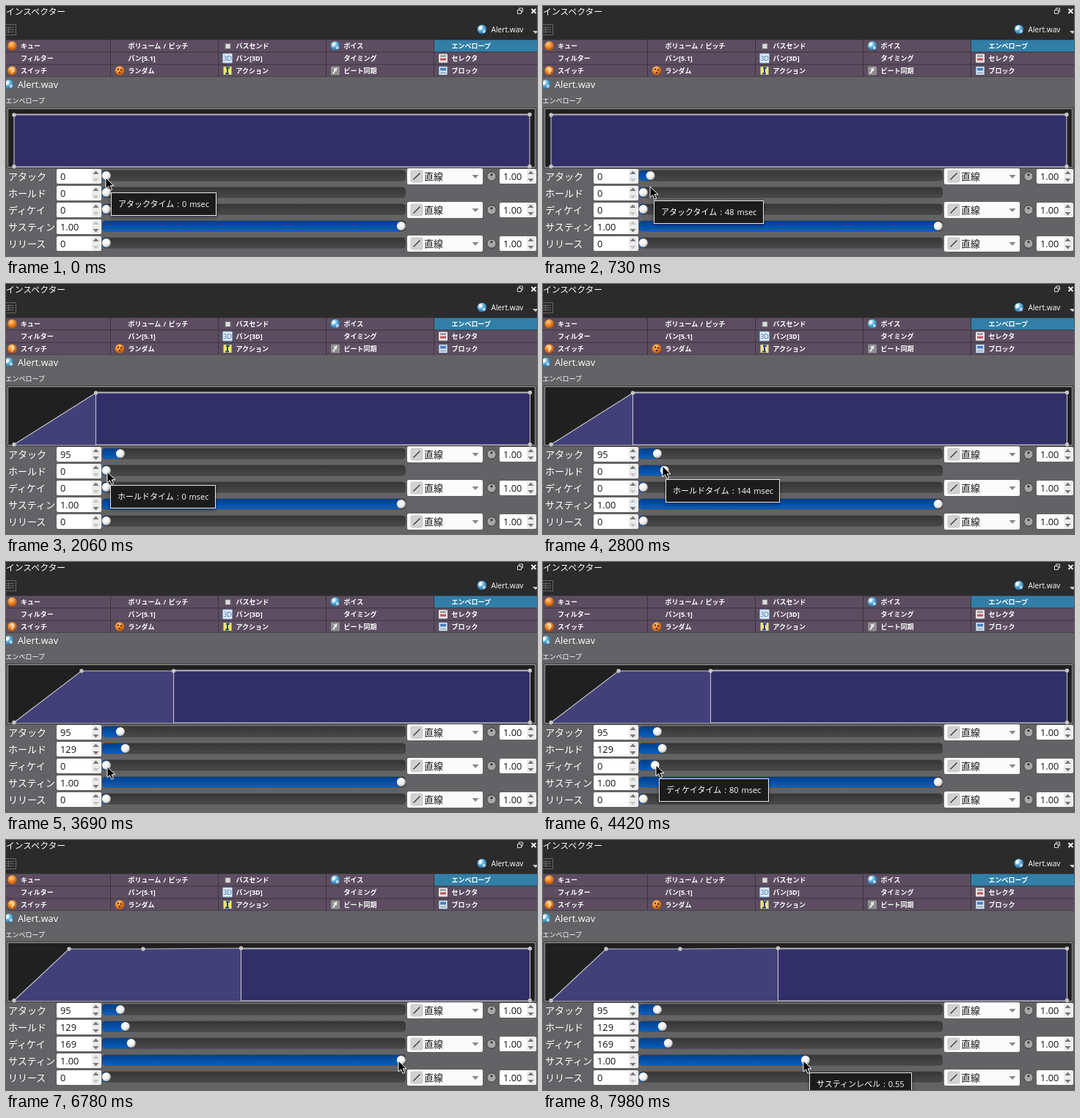
These frames come from a looping animation (724x342 px, 8 s). An HTML page:

```html
<!DOCTYPE html>
<html lang="ja">
<head>
<meta charset="utf-8">
<title>Envelope inspector</title>
<style>
html, body { margin: 0; width: 100%; height: 100%; overflow: hidden; background: #636366; }
svg { display: block; width: 724px; height: 342px; }
text { font-family: "Open Sans", "Noto Sans CJK JP", "Noto Sans CJK", sans-serif; font-weight: 500; fill: #fff; word-spacing: 1px; }
.num, .combo { font-size: 12.8px; fill: #111; }
.label { font-size: 13px; }
.tab { font-size: 9px; font-weight: 700; }
</style>
</head>
<body>
<svg id="stage" viewBox="0 0 724 342">
  <defs>
    <linearGradient id="track" x2="0" y2="1"><stop stop-color="#363636"/><stop offset="1" stop-color="#494949"/></linearGradient>
    <linearGradient id="blue" x2="0" y2="1"><stop stop-color="#003f8c"/><stop offset="1" stop-color="#0a5fbe"/></linearGradient>
    <radialGradient id="ball" cx=".4" cy=".35" r=".7"><stop stop-color="#fff"/><stop offset=".6" stop-color="#eee"/><stop offset="1" stop-color="#aaa"/></radialGradient>
    <radialGradient id="orange" cx=".4" cy=".3" r=".75"><stop stop-color="#ffd08a"/><stop offset=".5" stop-color="#ee8420"/><stop offset="1" stop-color="#a84c08"/></radialGradient>
    <radialGradient id="globe" cx=".35" cy=".3" r=".8"><stop stop-color="#e8f8ff"/><stop offset=".45" stop-color="#5ab0dc"/><stop offset="1" stop-color="#16508c"/></radialGradient>
    <filter id="shadow" x="-10%" y="-30%" width="120%" height="170%"><feDropShadow dx="0" dy="2" stdDeviation="2.5" flood-opacity=".45"/></filter>
  </defs>
  <g id="chrome"></g>
  <g id="envelope"></g>
  <g id="rows"></g>
  <g id="tip">
    <rect id="tipBox" x=".5" y=".5" height="31" fill="#1f1f1f" stroke="#e8e8e8" filter="url(#shadow)"/>
    <text id="tipText" x="10" y="20" font-size="11"></text>
  </g>
  <path id="cursor" d="M0 0V15L3.5 11.7L6 17.3L8.6 16.2L6.2 10.8H11Z" fill="#000" stroke="#fff" stroke-width="1"/>
</svg>
<script>
const $ = id => document.getElementById(id);
const rect = (x, y, w, h, fill, more = '') =>
  `<rect x="${x}" y="${y}" width="${w}" height="${h}" fill="${fill}" ${more}/>`;
const disc = (x, y, r, fill, more = '') => `<circle cx="${x}" cy="${y}" r="${r}" fill="${fill}" ${more}/>`;
const path = (d, fill, more = '') => `<path d="${d}" fill="${fill}" ${more}/>`;
const text = (x, y, s, more = '') => `<text x="${x}" y="${y}" ${more}>${s}</text>`;

// ---- header and tabs
const icons = {
  orange: (x, y) => disc(x, y, 6.3, 'url(#orange)'),
  turn: (x, y) => icons.orange(x, y) +
    path(`M${x - 2} ${y - 3}h3q3 3 -1 4v3`, 'none', 'stroke="#fff0d8" stroke-width="1.4"'),
  dice: (x, y) => icons.orange(x, y) +
    [[-2, -2], [2, -1], [0, 2.5]].map(([a, b]) => disc(x + a, y + b, 1.2, '#5a2600')).join(''),
  globe: (x, y) => disc(x, y, 6.3, 'url(#globe)') +
    path(`M${x - 4} ${y - 4}q5 -1 4 2t-4 3z`, '#fff', 'opacity=".8"') +
    path(`M${x + 1} ${y + 1}q3 -2 4 1t-4 3z`, '#e4f4fc', 'opacity=".7"'),
  send: (x, y) => rect(x - 3, y - 3, 7, 7, '#ddd', 'stroke="#777"'),
  pan: (x, y) => rect(x - 6.5, y - 6.5, 13, 13, '#e4eefa', 'rx="1" stroke="#7f9cc0"') +
    text(x, y + 3.5, '3D', 'font-size="9" font-weight="700" text-anchor="middle" style="fill:#2a62a8"'),
  action: (x, y) => rect(x - 6, y - 6, 12, 12, '#f2e66a', 'stroke="#557"') +
    path(`M${x - 2} ${y - 4}h5M${x} ${y - 4}v8M${x - 3} ${y + 4}h5`, 'none', 'stroke="#1d3f8c" stroke-width="2"'),
  beat: (x, y) => rect(x - 6, y - 6, 12, 12, '#8e8e8e', 'rx="1"') +
    path(`M${x - 3} ${y + 4}l5 -8M${x - 2} ${y - 3}l4 3`, 'none', 'stroke="#eee" stroke-width="2"'),
  select: (x, y) => rect(x - 6, y - 6, 12, 12, '#e6e6e6', 'rx="1"') +
    rect(x - 4, y - 4, 8, 2, '#888') + rect(x - 4, y, 8, 3, '#c8505a'),
  block: (x, y) => rect(x - 6, y - 6, 12, 12, '#dfe9f6', 'rx="1" stroke="#567"') +
    rect(x - 4, y - 4, 8, 4, '#4a7fc0') + rect(x - 4, y + 2, 8, 2, '#9ab')
};
const tabs = [
  ['キュー', 'orange'], ['ボリューム / ピッチ'], ['バスセンド', 'send'], ['ボイス', 'globe'], ['エンベロープ'],
  ['フィルター'], ['パン[5.1]'], ['パン[3D]', 'pan'], ['タイミング'], ['セレクタ', 'select'],
  ['スイッチ', 'turn'], ['ランダム', 'dice'], ['アクション', 'action'], ['ビート同期', 'beat'], ['ブロック', 'block']
];
const colX = [0, 143, 290, 437, 584, 725];
let out = rect(0, 0, 724, 46, '#2b2b2c') + rect(0, 46, 724, 51, '#3c333f') +
  text(0, 11.5, 'インスペクター', 'font-size="11.8"') +
  path('M697.5 5.5h5v5h-5zM699.5 5v-2h5v5h-2', 'none', 'stroke="#ddd"') +
  path('M716.5 4l6 6m0 -6l-6 6', 'none', 'stroke="#eee" stroke-width="2"') +
  path('M-1 25.5H13.5V39.5H-1M0 29.5h11M0 32.5h11M0 35.5h11M3.5 28v9', 'none', 'stroke="#666"') +
  icons.globe(649, 32) + text(661.5, 36, 'Alert.wav', 'font-size="10.2"') +
  path('M718 34h8l-4 4z', '#ccc');
tabs.forEach(([name, icon], i) => {
  const c = i % 5, y = 46 + 17 * Math.floor(i / 5), x = colX[c];
  out += rect(x, y + .5, colX[c + 1] - x - 1, 16, i === 4 ? '#317fa7' : '#5c4e60');
  if (icon) out += icons[icon](x + (c ? 12 : 8.5), y + 8.5);
  out += text(x + (c ? 23.5 : 20), y + 12, name, 'class="tab"');
});
out += icons.globe(4, 107) + text(16, 112, 'Alert.wav', 'font-size="12.8"') +
  text(-.5, 132.5, 'エンベロープ', 'font-size="9"') +
  rect(1.5, 139.5, 721, 82, '#202020', 'stroke="#3c3c3e"') +
  rect(2.5, 140.5, 719, 80, 'none', 'stroke="#a2a2a5"');
$('chrome').innerHTML = out;

// ---- parameter rows
const rows = [
  { name: 'アタック', tip: 'アタックタイム', max: 2000, curve: true },
  { name: 'ホールド', tip: 'ホールドタイム', max: 2000 },
  { name: 'ディケイ', tip: 'ディケイタイム', max: 2000, curve: true },
  { name: 'サスティン', tip: 'サスティンレベル', max: 1 },
  { name: 'リリース', tip: 'リリースタイム', max: 2000, curve: true }
];
const show = (i, v) => i === 3 ? v.toFixed(2) : String(Math.round(v));
const spin = (x, y, w, id, s) =>
  rect(x, y - 10, w, 20, '#fff', 'rx="2"') + rect(x + w - 13, y - 9.5, 12.5, 19, '#ececec', 'rx="2"') +
  path(`M${x + w - 11.5} ${y - 3}h8l-4 -4.5z`, '#777', `id="${id}Up"`) +
  path(`M${x + w - 11.5} ${y + 3}h8l-4 4.5z`, '#777', `id="${id}Dn"`) +
  text(x + 5, y + 4.7, s, `class="num" id="${id}"`);

$('rows').innerHTML = rows.map((r, i) => {
  const y = 233 + 23 * i;
  let s = text(3, y + 5, r.name, 'class="label"') + spin(69, y, 61, 'v' + i, '') +
    rect(131.5, y - 8, 413, 14, 'url(#track)', 'rx="4" stroke="#3a3a3a" stroke-width=".8"') +
    rect(131.5, y - 8, 6, 14, 'url(#blue)', `rx="4" id="fill${i}"`) +
    disc(137, y - 1, 6, 'url(#ball)', `id="thumb${i}"`);
  if (r.curve) {
    s += rect(547, y - 11, 103, 22, '#fbfbfb', 'rx="2"') +
      rect(552, y - 8, 16, 16, '#d2d2d2', 'rx="2" stroke="#b4b4b4" stroke-width=".6"') +
      path(`M555.5 ${y + 4.5}l9 -9`, 'none', 'stroke="#333" stroke-width="1.2"') +
      text(570.3, y + 5, '直線', 'class="combo"') + path(`M635.5 ${y - 2}h9l-4.5 5z`, '#888') +
      disc(662, y, 6.2, '#a8a8a8', 'stroke="#3c3c3c"') + disc(662, y - 2.2, 1.6, '#333') +
      spin(673, y, 50, 'c' + i, '1.00');
  }
  return s;
}).join('');

// ---- envelope, drawn from the x of its breakpoints
function envelope(xs) {
  const last = xs.at(-1), end = xs.length > 1 ? 714.5 : 714;
  const top = 149, line = 'stroke="#c4c4c8" stroke-width="1.1"';
  const pts = xs.map((x, i) => [x, xs.length > 1 && i === 0 ? 219.5 : i === 3 ? 148 : top]);
  const d = 'M' + pts.map(p => p.join(' ')).join('L');
  const dots = [...pts, [end, top - .5], [end, 219.5]];
  if (xs.length === 1) dots.push([xs[0], 219.5]);
  $('envelope').innerHTML =
    path(`${d}V220H${xs[0]}Z`, '#434079') + rect(last, 148.5, end - last, 71.5, '#322f68', line) +
    path(`M${last} 148.5H${end}`, 'none', 'stroke="#b4b4ba" stroke-width="1.8"') +
    path(d, 'none', line) + dots.map(([x, y]) => disc(x, y, 2.7, '#c6c6c6')).join('');
}

// step, pointer x, pointer y, dragged row (-1: none), value
const moves = [
  [0, 136, 235, 0, 0], [4, 146, 247, 0, 48], [8, 155, 235, 0, 95], [9, 155, 235, 0, 95],
  [10, 155, 235, -1, 0], [13, 138, 257, -1, 0],
  [14, 138, 257, 1, 0], [17, 160, 250, 1, 139], [18, 160, 250, 1, 139], [19, 163, 249, 1, 144],
  [20, 160, 249, 1, 129], [21, 160, 249, 1, 129], [22, 160, 249, -1, 0], [25, 138, 280, -1, 0],
  [26, 138, 280, 2, 0], [30, 154, 278, 2, 80], [33, 172, 278, 2, 169],
  [34, 172, 278, -1, 0], [36, 230, 300, -1, 0], [37, 260, 303, 3, 1],
  [38, 441, 325, -1, 0], [43, 537, 306, -1, 0], [44, 542, 306, 3, 1], [45, 541, 304, 3, 1],
  [46, 535, 302, -1, 0], [47, 533, 302, 3, .99], [52, 373, 303, 3, .6], [54, 355, 302, 3, .55]
];
function pose(k) {
  let i = moves.length - 1;
  while (moves[i][0] > k) i--;
  const a = moves[i], b = moves[i + 1] || a;
  const p = b === a ? 0 : (k - a[0]) / (b[0] - a[0]);
  const mix = n => a[n] + (b[n] - a[n]) * p;
  return { x: Math.round(mix(1)), y: Math.round(mix(2)), row: a[3], value: mix(4) };
}
const place = (id, x, y) => $(id).setAttribute('transform', `translate(${x} ${y})`);

function draw(k) {
  const { x, y, row, value } = pose(k);
  const set = [k < 10 ? 0 : 95, k < 22 ? 0 : 129, k < 34 ? 0 : 169, 1, 0];
  envelope(k < 10 ? [11] : k < 22 ? [11, 122.5] : k < 34 ? [11, 103, 228.5] : [11, 86, 187, 320.5]);
  rows.forEach((r, i) => {
    const tx = 136.8 + 402 * (i === row ? value : set[i]) / r.max;
    $('v' + i).textContent = show(i, set[i]);
    $(`v${i}Up`).setAttribute('fill', set[i] === r.max ? '#c4c4c4' : '#777');
    $(`v${i}Dn`).setAttribute('fill', set[i] === 0 ? '#c4c4c4' : '#777');
    $('thumb' + i).setAttribute('cx', tx);
    $('fill' + i).setAttribute('width', tx - 131.5);
  });
  place('cursor', x, y);
  $('tip').style.display = row < 0 ? 'none' : '';
  if (row >= 0) {
    const s = show(row, value);
    const [dx, dy] = row === 0 ? [7 - value / 30, 20 - value / 48] : row === 3 ? [8, 16] : [4, 18];
    $('tipText').textContent = `${rows[row].tip} : ${s}${row === 3 ? '' : ' msec'}`;
    $('tipBox').setAttribute('width', row === 3 ? 139 : 143 + 6 * (s.length - 1));
    place('tip', Math.round(x + dx), Math.round(y + dy));
  }
}

const start = performance.now();
let shown = -1;
function tick() {
  const t = (performance.now() - start) % 8000;
  const k = t < 6780 ? Math.min(45, Math.floor(t / 147)) : 46 + Math.floor((t - 6780) / 150);
  if (k !== shown) draw(shown = k);
  requestAnimationFrame(tick);
}
tick();
</script>
</body>
</html>
```
